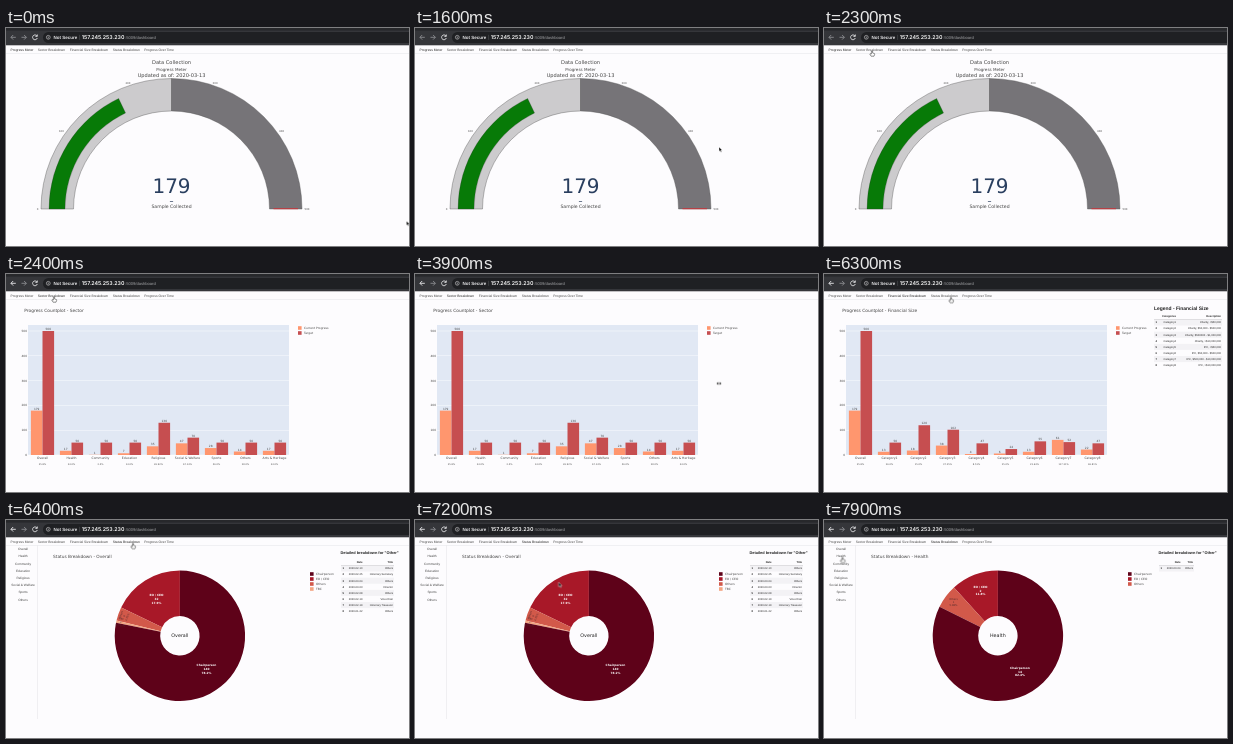
These frames come from a looping animation (403x218 px, 8 s). An HTML page:

```html
<!DOCTYPE html>
<html lang="en">
<head>
<meta charset="utf-8">
<title>Dashboard tour</title>
<style>
html, body { margin: 0; width: 100%; height: 100%; overflow: hidden; background: #fdfcfe; }
svg { display: block; width: 403px; height: 218px; }
text { font-family: "DejaVu Sans", sans-serif; fill: #444; text-rendering: geometricPrecision; }
.ui { font-family: "Liberation Sans", Arial, sans-serif; }
.dark { fill: #222; }
.b { font-weight: bold; }
.view, #arrow, #hand, #resize, #back { animation: 8s step-end infinite; }
#meter { animation-name: meter; }
#sector { animation-name: sector; }
#size { animation-name: size; }
#overall { animation-name: overall; }
#health { animation-name: health; }
#back { animation-name: back; }
#pointer { animation: move 8s ease-in-out infinite; }
#arrow { animation-name: arrow; }
#hand { animation-name: hand; }
#resize { animation-name: resize; }
@keyframes meter { 0% { visibility: visible } 29.4%, 100% { visibility: hidden } }
@keyframes sector { 0% { visibility: hidden } 29.4% { visibility: visible } 58.1%, 100% { visibility: hidden } }
@keyframes size { 0% { visibility: hidden } 58.1% { visibility: visible } 79.4%, 100% { visibility: hidden } }
@keyframes overall { 0% { visibility: hidden } 79.4% { visibility: visible } 96.9%, 100% { visibility: hidden } }
@keyframes health { 0% { visibility: hidden } 96.9%, 100% { visibility: visible } }
@keyframes back { 0% { stroke: #8d8e91 } 29.4%, 100% { stroke: #e8e8ea } }
@keyframes move {
  0%, 5% { transform: translate(400.5px, 193px) }
  15%, 20.2% { transform: translate(304px, 119px) }
  26.3%, 31.3% { transform: translate(48px, 23px) }
  37.5%, 51.9% { transform: translate(304px, 109.5px) }
  56.3%, 59.4% { transform: translate(84px, 21px) }
  63.1%, 66.4% { transform: translate(335px, 130px) }
  71.3%, 72.5% { transform: translate(124px, 21.5px) }
  75%, 80.6% { transform: translate(127px, 23.5px) }
  85.6%, 86.9% { transform: translate(330px, 100px) }
  92.5%, 93.8% { transform: translate(17px, 36.5px) }
  96.3%, 100% { transform: translate(18.5px, 37.5px) }
}
@keyframes arrow {
  0% { visibility: visible } 25.8% { visibility: hidden } 32% { visibility: visible }
  37.4% { visibility: hidden } 52.2% { visibility: visible } 55.8% { visibility: hidden }
  60% { visibility: visible } 70.8% { visibility: hidden } 81.2% { visibility: visible }
  92%, 100% { visibility: hidden }
}
@keyframes hand {
  0% { visibility: hidden } 25.8% { visibility: visible } 32% { visibility: hidden }
  55.8% { visibility: visible } 60% { visibility: hidden } 70.8% { visibility: visible }
  81.2% { visibility: hidden } 92%, 100% { visibility: visible }
}
@keyframes resize { 0% { visibility: hidden } 37.4% { visibility: visible } 52.2%, 100% { visibility: hidden } }
</style>
</head>
<body>
<svg id="stage" viewBox="0 0 403 218"></svg>
<script>
const text = (x, y, s, size, anchor = "start", cls = "", extra = "") =>
  `<text x="${x}" y="${y}" font-size="${size}" text-anchor="${anchor}" class="${cls}" ${extra}>${s.toString().replace(/&/g, "&amp;").replace(/</g, "&lt;")}</text>`;
const rect = (x, y, w, h, fill, extra = "") =>
  `<rect x="${x}" y="${y}" width="${w}" height="${h}" fill="${fill}" ${extra}/>`;
const view = (id, body) => `<g id="${id}" class="view">${body}</g>`;

// Point at a clockwise angle in degrees from 12 o'clock
const polar = (cx, cy, r, deg) => {
  const a = deg * Math.PI / 180;
  return `${(cx + r * Math.sin(a)).toFixed(2)} ${(cy - r * Math.cos(a)).toFixed(2)}`;
};
const ring = (cx, cy, r0, r1, a, b, fill, extra = "") => {
  const big = b - a > 180 ? 1 : 0;
  return `<path d="M${polar(cx, cy, r1, a)}A${r1} ${r1} 0 ${big} 1 ${polar(cx, cy, r1, b)}L${polar(cx, cy, r0, b)}A${r0} ${r0} 0 ${big} 0 ${polar(cx, cy, r0, a)}Z" fill="${fill}" ${extra}/>`;
};

const TABS = [["Progress Meter", 4.5], ["Sector Breakdown", 31.7], ["Financial Size Breakdown", 63.7],
  ["Status Breakdown", 106.7], ["Progress Over Time", 138.2]];
const tabs = active => TABS.map(([s, x], i) =>
  text(x, 22.8, s, 3.35, "start", i === active ? "ui dark" : "ui")).join("");

function browser() {
  return rect(0, 0, 403, 17.3, "#35363a") + rect(0, 0, 403, 2.6, "#27282b") +
    rect(37, 4, 380, 11, "#1f2023", 'rx="5.5"') +
    `<g fill="none" stroke="#8d8e91" stroke-width=".9">
      <path id="back" d="M9.8 9.3H5M7.2 7L4.9 9.3L7.2 11.6"/>
      <path d="M15.5 9.3H20.3M18.1 7L20.4 9.3L18.1 11.6"/>
      <path stroke="#e0e0e2" d="M31 8A2.4 2.4 0 1 0 31.3 10M31.3 6.5V8.4H29.4"/>
      <circle cx="42.3" cy="9.3" r="1.9" stroke="#d0d0d2" stroke-width=".6"/>
      <path d="M42.3 8.9V10.4M42.3 8V8.4" stroke="#d0d0d2" stroke-width=".6"/>
      <path d="M73.6 6.8V11.8" stroke="#66676a" stroke-width=".4"/></g>` +
    text(47.6, 10.9, "Not Secure", 4.5, "start", "ui b", 'style="fill:#e6e6e8"') +
    text(75.7, 11, "157.245.253.230", 5.3, "start", "", 'style="fill:#fff;font-family:Inter,sans-serif;font-weight:600"') +
    text(119, 11, ":5009/dashboard", 4.1, "start", "ui", 'style="fill:#a0a1a4"') +
    rect(0, 25.2, 403, .4, "#dddce0");
}

function meter() {
  const cx = 165.5, cy = 181, line = 'stroke="#555" stroke-width=".4"';
  const ticks = [0, 100, 200, 300, 400, 500].map(v => {
    const [x, y] = polar(cx, cy, 133, v * .36 - 90).split(" ");
    return text(x, +y + 1, v, 2.6, v < 250 ? "end" : "start");
  }).join("");
  return tabs(0) +
    text(cx, 36.2, "Data Collection", 5.1, "middle") +
    text(cx, 42.8, "Progress Meter", 4.1, "middle") +
    text(cx, 49.2, "Updated as of: 2020-03-13", 5.05, "middle") +
    ring(cx, cy, 98, 130.5, -90, 0, "#cccbcd", line) +
    ring(cx, cy, 98, 130.5, 0, 90, "#767478", line) +
    ring(cx, cy, 106.5, 122.5, -90, 179 * .36 - 90, "#077a07", 'stroke="#333" stroke-width=".25"') +
    rect(cx + 102, 180.2, 24.5, 1, "#c8363b") + ticks +
    text(cx, 164.6, "179", 20, "middle", "", 'style="fill:#2a3f5f"') +
    rect(cx - 1.6, 173.2, 3.2, .8, "#4a5a74") +
    text(cx, 179.8, "Sample Collected", 4.6, "middle");
}

const ORANGE = "#ff966e", RED = "#c64e50";
const legend = (x, items) => items.map(([s, fill], i) =>
  rect(x, 52.2 + i * 5, 3.6, 3.6, fill) + text(x + 6, 55.2 + i * 5, s, 2.95)).join("");

// Rows hold: label, progress, goal, share
function bars(title, rows) {
  const y = v => 181 - v * .248;
  let out = text(18.3, 37.7, title, 4.35) + rect(22, 51, 261, 130, "#e1e8f4");
  for (let v = 0; v <= 500; v += 100)
    out += rect(22, y(v) - .2, 261, .4, "#fff") + text(21, y(v) + 1, v, 2.9, "end");
  rows.forEach(([label, now, goal, share], i) => {
    const x = 36.5 + 29 * i;
    out += rect(x - 11.6, y(now), 11.6, now * .248, ORANGE) + rect(x, y(goal), 11.6, goal * .248, RED) +
      text(x - 5.8, y(now) - 1, now, 2.9, "middle") + text(x + 5.8, y(goal) - 1, goal, 2.9, "middle") +
      text(x, 185.3, label, 3.1, "middle") + text(x, 191, share + "%", 2.3, "middle");
  });
  return out + legend(292, [["Current Progress", ORANGE], ["Target", RED]]);
}

function table(x, w, col, heads, rows) {
  const right = x + w - 1;
  let out = text(col, 43.2, heads[0], 2.7, "end", "ui b dark") + text(right, 43.2, heads[1], 2.7, "end", "ui b dark") +
    rect(x, 45, w, .4, "#666");
  rows.forEach(([a, b], i) => {
    const y = 49.3 + 6.1 * i;
    out += (i % 2 ? "" : rect(x, y - 3.9, w, 6.1, "#f3f2f5")) +
      text(x + 1.4, y, i + 1, 2.7, "start", "ui b dark") +
      text(col, y, a, 2.7, "end", "ui dark") + text(right, y, b, 2.7, "end", "ui dark");
  });
  return out;
}

const SIDE = ["Overall", "Health", "Community", "Education", "Religious", "Social & Welfare", "Sports", "Others"];
const SHADES = { "Chairperson": "#5e0219", "EO / CEO": "#a81828", "Others": "#d2594a", "TBC": "#f4a582" };

// Slices run counterclockwise from the top: name, count, share, label x, y, turn
function status(name, slices) {
  const cx = 173.9, cy = 115.8;
  const total = slices.reduce((sum, s) => sum + s[1], 0);
  let end = 360, pie = "", labels = "";
  for (const [s, n, share, x, y, turn = 0] of slices) {
    const start = end - n / total * 360, light = s === "Chairperson" || s === "EO / CEO";
    pie += ring(cx, cy, 19.7, 65.2, start, end, SHADES[s]);
    end = start;
    const size = light ? 2.9 : 2.5, look = light ? 'style="fill:#fff"' : 'style="fill:#512a2c"';
    labels += `<g transform="rotate(${turn} ${x} ${y})">` + [s, n, share + "%"].map((t, i) =>
      text(x, y + 1 + (i - 1) * size * 1.35, t, size, "middle", light ? "b" : "", look)).join("") + "</g>";
  }
  const side = SIDE.map((s, i) => text(17, 30.3 + i * 7.18, s, 3.2, "middle", "ui")).join("");
  return tabs(3) + rect(31.2, 25.5, .4, 173.5, "#dddce0") + side +
    text(47, 37.7, "Status Breakdown - " + name, 4.3) + pie + labels +
    text(cx, cy + 1.6, name, 4.8, "middle", "dark") +
    legend(304, slices.map(s => s[0]).sort().map(s => [s, SHADES[s]])) +
    text(334.5, 34.4, 'Detailed breakdown for "Other"', 3.9, "start", "ui b dark");
}

const sectors = [["Overall", 179, 500, "35.8"], ["Health", 17, 50, "34.0"], ["Community", 1, 50, "2.0"],
  ["Education", 7, 50, "14.0"], ["Religious", 35, 130, "26.92"], ["Social & Welfare", 47, 70, "67.14"],
  ["Sports", 28, 50, "56.0"], ["Others", 14, 50, "28.0"], ["Arts & Heritage", 17, 50, "34.0"]];
const sizes = [["Overall", 179, 500, "35.8"], ["Category1", 13, 50, "26.0"], ["Category2", 18, 120, "15.0"],
  ["Category3", 38, 102, "37.25"], ["Category4", 4, 47, "8.51"], ["Category5", 6, 24, "25.0"],
  ["Category6", 13, 55, "23.64"], ["Category7", 61, 52, "117.31"], ["Category8", 22, 47, "46.81"]];
const bands = ["Charity, <$50,000", "Charity, $50,000 - $500,000", "Charity, $500000 - $1,000,000",
  "Charity, >$10,000,000", "IPC, <$50,000", "IPC, $50,000 - $500,000", "IPC, $500,000 - $10,000,000",
  "IPC, >$10,000,000"].map((s, i) => ["Category" + (i + 1), s]);
const others = [["2020-02-10", "Others"], ["2020-02-25", "Honorary Secretary"], ["2020-03-04", "Others"],
  ["2020-03-03", "Director"], ["2020-02-08", "Others"], ["2020-02-19", "Vice-Chair"],
  ["2020-02-19", "Honorary Treasurer"], ["2020-01-22", "Others"]];

const pointer = `<g id="pointer">
  <path id="arrow" d="M0 0V4.6L1.1 3.6L1.9 5.3L2.7 4.9L1.9 3.3H3.3Z" fill="#111" stroke="#fff" stroke-width=".4"/>
  <path id="hand" d="M-.6 0Q0-.6 .6 0V2L2.4 2.5Q2.8 2.8 2.6 3.6L2 5.2H-.9L-2.2 3Q-1.8 2.3-.6 3Z" fill="#fff" stroke="#222" stroke-width=".5"/>
  <path id="resize" d="M-2.6 0L-.8-1.6V-.5H.8V-1.6L2.6 0L.8 1.6V.5H-.8V1.6Z" fill="#222" stroke="#fff" stroke-width=".3"/></g>`;

document.getElementById("stage").innerHTML = rect(0, 0, 403, 218, "#fdfcfe") + browser() +
  view("meter", meter()) +
  view("sector", tabs(1) + bars("Progress Countplot - Sector", sectors)) +
  view("size", tabs(2) + bars("Progress Countplot - Financial Size", sizes) +
    text(330, 36, "Legend - Financial Size", 4.95, "start", "ui b dark") +
    table(330, 68, 352, ["Categories", "Description"], bands)) +
  view("overall", status("Overall", [["EO / CEO", 32, "17.9", 150.5, 79], ["Others", 6, "3.35", 118, 96, -70],
    ["TBC", 1, "0.559", 115, 102, 10], ["Chairperson", 140, "78.2", 200.5, 149]]) +
    table(335, 53, 356.5, ["Date", "Title"], others)) +
  view("health", status("Health", [["EO / CEO", 2, "11.8", 156.5, 70.5], ["Others", 1, "5.88", 129.5, 82],
    ["Chairperson", 14, "82.4", 196, 151.5]]) +
    table(335, 35, 356.5, ["Date", "Title"], [["2020-03-04", "Others"]])) +
  pointer;
</script>
</body>
</html>
```
